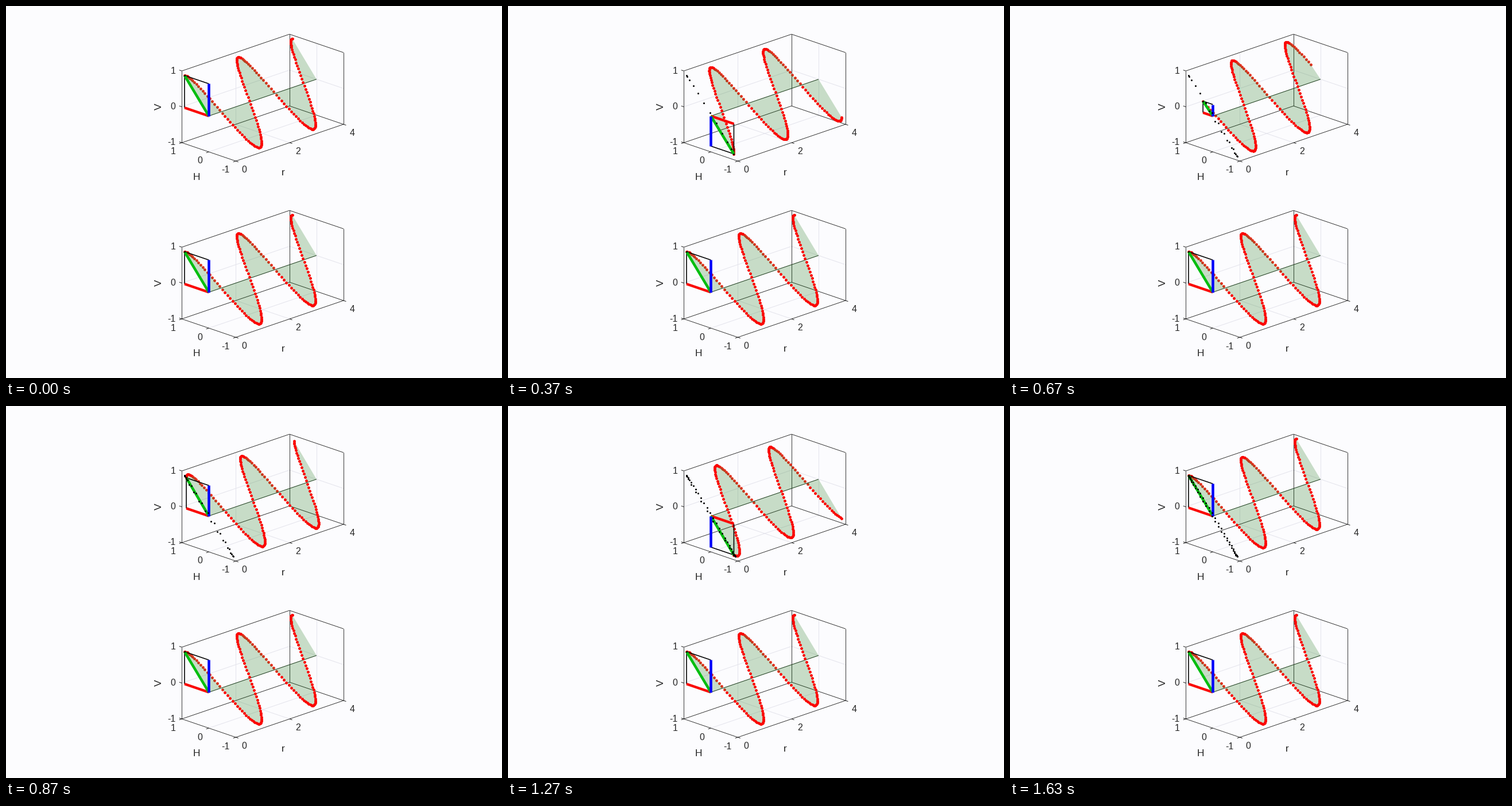
Animation of 864 by 648 pixels, one loop 1660 ms. Source, as a matplotlib script:

```python
from itertools import combinations, permutations, product

import numpy as np
import matplotlib.pyplot as plt
from matplotlib.animation import FuncAnimation
from matplotlib.patches import Polygon

W, H, DPI = 864, 648, 100
PX = 72 / DPI                 # points per pixel
BG, INK, GRID = "#fcfcfe", "#262626", "#e4e4ec"
RED, GREEN, BLUE = "#fa0804", "#06be10", "#0404fa"

STEPS = 50                    # wave positions per loop
TICK_MS = 10
TICKS = 166
AMP = 0.9
LAG = np.radians(3)           # vertical part trails the horizontal one
R = np.arange(0, 4.01, 0.025)

CENTRE = 353.3, 191.6         # pixel of r = H = V = 0 in the upper panel
RANGES = (0, 4), (-1, 1), (-1, 1)
FRONT, BACK = (0, -1, 1), (4, 1, -1)

plt.rcParams["font.family"] = "Liberation Sans"
fig = plt.figure(figsize=(W / DPI, H / DPI), dpi=DPI, facecolor=BG)
ax = fig.add_axes([0, 0, 1, 1])
ax.set_xlim(0, W)
ax.set_ylim(H, 0)
ax.axis("off")


def angle(step):
    return 4 * np.pi * step / (STEPS - 1)


def field(phase):
    return AMP * np.cos(phase), AMP * np.cos(phase + LAG)


class Panel:
    def __init__(self, dy):
        self.dy = dy
        self.draw_grid()
        self.draw_box()
        self.draw_labels()

        self.back_dots = self.dots("#e83020", 4.9, 3)
        self.fill = Polygon([[0, 0]], closed=True, fc=(0.05, 0.43, 0.02, 0.22),
                            ec="none", zorder=4)
        ax.add_patch(self.fill)
        self.segment((0, 0, 0), (4, 0, 0), "#1c3c1c", 1, 5)
        self.front_dots = self.dots(RED, 4.9, 6)
        self.frame = self.line("black", 1.6, 7)
        self.h_bar = self.line(RED, 4.4, 8)
        self.sum_bar = self.line(GREEN, 4.6, 9)
        self.v_bar = self.line(BLUE, 4.6, 10)
        self.trail = self.dots("black", 3, 11)

    def at(self, r, h, v):
        """Parallel projection to pixels."""
        x = CENTRE[0] + 46.9 * r - 47 * h
        y = CENTRE[1] - 16 * r - 16 * h - 62.5 * v
        return x, y + self.dy

    def line(self, color, px, z):
        return ax.plot([], [], color=color, lw=px * PX, zorder=z,
                       solid_capstyle="butt", solid_joinstyle="miter")[0]

    def dots(self, color, px, z):
        return ax.plot([], [], "o", color=color, ms=px * PX, mew=0, zorder=z)[0]

    def path(self, artist, *points):
        artist.set_data(*zip(*(self.at(*p) for p in points)))

    def segment(self, a, b, color, px, z):
        self.path(self.line(color, px, z), a, b)

    def draw_grid(self):
        # the middle of each axis, carried over the two back faces it meets
        for mid, along in permutations(range(3), 2):
            a = list(BACK)
            a[mid] = sum(RANGES[mid]) / 2
            b = a.copy()
            a[along], b[along] = RANGES[along]
            self.segment(a, b, GRID, 1, 1)

    def draw_box(self):
        for a, b in combinations(product(*RANGES), 2):
            is_edge = sum(p != q for p, q in zip(a, b)) == 1
            if is_edge and FRONT not in (a, b):
                self.segment(a, b, INK, 0.9, 2)

    def text(self, point, dx, dy, s, px=16, ha="center", **kw):
        x, y = self.at(*point)
        ax.text(x + dx, y + dy, s, fontsize=px * PX, color=INK, ha=ha,
                va="center" if kw else "center_baseline", zorder=12, **kw)

    def tick(self, point, dx, dy):
        x, y = self.at(*point)
        self.line(INK, 1, 2).set_data([x, x + dx], [y, y + dy])

    def draw_labels(self):
        for n in (-1, 0, 1):
            r = 2 * n + 2
            self.tick((0, 1, n), -4.5, -1.5)
            self.tick((0, n, -1), -4.5, 1.5)
            self.tick((r, -1, -1), 4.5, 1.5)
            self.text((0, 1, n), -11, -1.6, n, ha="right")
            self.text((0, n, -1), -11, 14.4, n, ha="right")
            self.text((r, -1, -1), 15, 14.2, r)
        self.text((0, 0, -1), -21, 43, "H", 17.5)
        self.text((2, -1, -1), -11.6, 51, "r", 17.5)
        self.text((0, 1, 0), -40, 0, "V", 17.5, rotation=90)

    def update(self, step):
        phase = np.pi * R - angle(step)
        x, y = self.at(R, *field(phase))
        # falling upper flanks lie behind the sheet
        behind = (np.cos(phase) > 0) & (np.sin(phase) > 0.25)
        self.back_dots.set_data(x[behind], y[behind])
        self.front_dots.set_data(x[~behind], y[~behind])
        edge = [self.at(4, 0, 0), self.at(0, 0, 0)]
        self.fill.set_xy(np.vstack([np.column_stack([x, y]), edge]))

        h, v = field(-angle(step))
        origin, h_end, v_end, tip = (0, 0, 0), (0, h, 0), (0, 0, v), (0, h, v)
        self.path(self.frame, h_end, tip, v_end)
        self.path(self.h_bar, origin, h_end)
        self.path(self.v_bar, origin, v_end)
        self.path(self.sum_bar, origin, tip)
        past = -angle(np.arange(step + 1))
        self.trail.set_data(*self.at(0, *field(past)))


upper, lower = Panel(0), Panel(307)
lower.update(0)


def update(tick):
    # 30 steps per second, rounded to the 10 ms clock
    upper.update(int(0.3 * tick + 0.15))
    return []


def init():
    return update(0)


anim = FuncAnimation(fig, update, frames=TICKS, init_func=init,
                     interval=TICK_MS, repeat=True, repeat_delay=0, blit=False)
plt.show()
```
